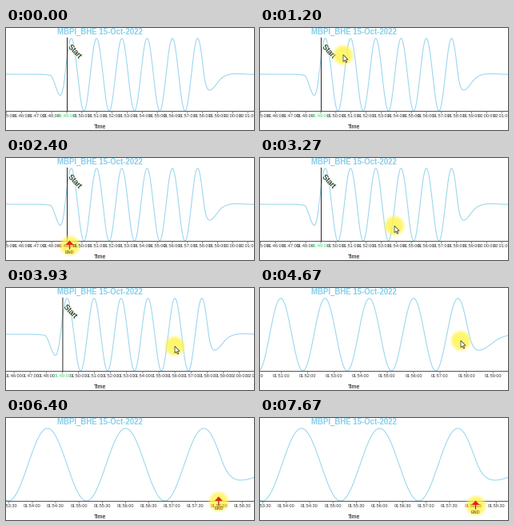
Write a matplotlib script that moves like this. It is 310 by 128 pixels and loops after 7.79 s.

```python
import numpy as np
import matplotlib.pyplot as plt
from matplotlib import patheffects
from matplotlib.animation import FuncAnimation
from matplotlib.patches import Polygon

W, H, DPI = 310, 128, 100
FRAMES, STEP = 205, 38          # 7790 ms per loop
AXIS_Y = 104.5
SKY = "#87ceeb"
INK = "#333333"
GREEN = "#45cc74"
AMBER = "#b06a20"

plt.rcParams["font.family"] = "Liberation Sans"


def pt(px):
    return px * 72 / DPI


# --- signal: y in pixels as a function of minutes after 01:00 ---
OMEGA = 2 * np.pi / 1.675
SINE_FROM, SINE_TO = 48.88, 58.05


def sine(t):
    return 58.5 - 45.5 * np.cos(OMEGA * (t - 56))


def sine_slope(t):
    return 45.5 * OMEGA * np.sin(OMEGA * (t - 56))


def hermite(t, knots):
    kt, ky, km = np.array(knots).T
    t = np.clip(t, kt[0], kt[-1])
    i = np.clip(np.searchsorted(kt, t, side="right") - 1, 0, len(kt) - 2)
    d = kt[i + 1] - kt[i]
    u = (t - kt[i]) / d
    s = u * u * (3 - 2 * u)
    return (ky[i] * (1 - s) + ky[i + 1] * s
            + d * u * (1 - u) * ((1 - u) * km[i] - u * km[i + 1]))


HEAD = [(46.5, 58, 0), (47.9, 59.3, 3), (48.57, 84.5, 0),
        (SINE_FROM, sine(SINE_FROM), sine_slope(SINE_FROM))]
TAIL = [(SINE_TO, sine(SINE_TO), sine_slope(SINE_TO)), (58.47, 78, 0),
        (58.8, 73.5, -23), (59.15, 65, -20), (59.6, 59.3, -7),
        (60.3, 57.4, 0), (61.3, 58.2, 0)]


def signal(t):
    return np.where(t < SINE_FROM, hermite(t, HEAD),
                    np.where(t < SINE_TO, sine(t), hermite(t, TAIL)))


# --- motion ---
ZOOM_T = [3700, 3930, 4620, 4820, 5560]
ZOOM_S = [18.85, 20.2, 33.05, 33.05, 58.3]      # pixels per minute
PAN_S = [18.85, 20.2, 33.05, 58.3]
PAN_X = [207.95, 211.4, 192, 149.5]             # x of 01:56:00

POINTER_ON = 870
POINTER = np.array([
    (870, 116, 58), (1180, 104, 33.5), (1400, 103, 31.5), (1550, 103, 31.5),
    (1740, 93, 60), (1850, 93, 60), (2380, 79.5, 110), (2570, 79.5, 110),
    (3700, 211, 73), (3940, 211, 73), (4250, 251, 66), (5380, 251, 66),
    (5590, 231, 58), (5640, 231, 58), (6560, 269.5, 110)])


def view(ms):
    scale = np.exp(np.interp(ms, ZOOM_T, np.log(ZOOM_S)))
    return scale, np.interp(scale, PAN_S, PAN_X)


def pointer_at(ms):
    times = POINTER[:, 0]
    i = int(np.clip(np.searchsorted(times, ms, side="right") - 1,
                    0, len(times) - 2))
    u = np.clip((ms - times[i]) / (times[i + 1] - times[i]), 0, 1)
    u = u * u * (3 - 2 * u)
    return POINTER[i, 1:] * (1 - u) + POINTER[i + 1, 1:] * u


def clock(minutes):
    sec = int(round(minutes * 60)) + 3600
    return f"{sec // 3600:02d}:{sec // 60 % 60:02d}:{sec % 60:02d}"


# --- stage ---
fig = plt.figure(figsize=(W / DPI, H / DPI), dpi=DPI, facecolor="white")
ax = fig.add_axes([0, 0, 1, 1])
ax.set_axis_off()

ax.text(64, 7.8, "MBPI_BHE 15-Oct-2022", color=SKY, size=pt(9.6),
        weight="bold", va="baseline")
ax.text(117.7, 125.7, "Time", color="black", size=pt(7), ha="center",
        va="baseline")

xs = np.arange(-1, W + 1.5, 0.5)
curve, = ax.plot([], [], color=SKY, lw=pt(1.05), alpha=0.85, zorder=2)
ax.plot([0, W], [AXIS_Y, AXIS_Y], color="#555555", lw=pt(1), snap=False,
        zorder=3)
ticks, = ax.plot([], [], color="#666666", lw=pt(0.8), snap=False, zorder=3)
labels = [ax.text(0, 112.2, "", color=INK, size=pt(5.5), ha="center",
                  va="baseline", zorder=6) for _ in range(20)]

start_line, = ax.plot([], [], color="#2a2a2a", lw=pt(1), snap=False, zorder=3)
start_text = ax.text(0, 29.5, "Start", color="black", size=pt(9.3),
                     ha="center", va="center", rotation=-47,
                     rotation_mode="anchor", zorder=4)
start_text.set_path_effects([
    patheffects.withStroke(linewidth=pt(2.4), foreground="#e4f3e4")])

# soft yellow spot around the pointer
R = 15
gy, gx = np.mgrid[-R:R:61j, -R:R:61j]
glow = np.ones((61, 61, 4))
glow[..., :3] = (1, 0.96, 0.3)
glow[..., 3] = 0.8 * np.clip((14.5 - np.hypot(gx, gy)) / 5, 0, 1)
spot = ax.imshow(glow, extent=(0, 1, 1, 0), aspect="auto",
                 interpolation="bilinear", zorder=5)

ARROW = np.array([(0, 0), (0, 8.6), (2, 6.8), (3.4, 9.9), (4.7, 9.3),
                  (3.4, 6.3), (6, 6.2)])
arrow = ax.add_patch(Polygon(ARROW, fc="white", ec="#4a4a4a", lw=pt(0.85),
                             zorder=8))

HEAD_UP = np.array([(0, -6.5), (5, -1), (-5, -1)])
head = ax.add_patch(Polygon(HEAD_UP, fc="#e0281c", ec="none", zorder=8))
stem, = ax.plot([], [], color="#b03018", lw=pt(1.3), snap=False, zorder=7)
end_text = ax.text(0, 0, "END", color="#5a3a10", size=pt(5.4), ha="center",
                   va="baseline", zorder=8)

ax.set_xlim(0, W)
ax.set_ylim(H, 0)


def draw_ticks(scale, x56, hover_x):
    step = 0.5 if scale > 36 else 1
    first = np.ceil((56 + (-15 - x56) / scale) / step) * step
    tx, ty = [], []
    for k, label in enumerate(labels):
        minute = first + k * step
        x = x56 + scale * (minute - 56)
        label.set_visible(x < W + 15)
        label.set_x(x)
        label.set_text(clock(minute))
        color = GREEN if minute == 49 else INK
        if hover_x is not None and abs(x - hover_x) < 6:
            color = AMBER
        label.set_color(color)
        tx += [x, x, np.nan]
        ty += [AXIS_Y, AXIS_Y + 2.3, np.nan]
    ticks.set_data(tx, ty)


def draw_pointer(ms, x, y, hover):
    shown = ms >= POINTER_ON
    spot.set_visible(shown)
    spot.set_extent((x - R, x + R, y + R, y - R))
    arrow.set_visible(shown and not hover)
    arrow.set_xy(ARROW + (x, y))
    for part in (head, stem, end_text):
        part.set_visible(hover)
    head.set_xy(HEAD_UP + (x, y))
    stem.set_data([x, x], [y - 1.5, y + 4])
    end_text.set_position((x, y + 10.2))


def draw(i):
    ms = i * STEP
    scale, x56 = view(ms)
    curve.set_data(xs, signal(56 + (xs - x56) / scale))

    x0 = x56 - 7 * scale + 0.5
    start_line.set_data([x0, x0], [12.5, AXIS_Y])
    start_text.set_x(x0 + 9.7)
    start_text.set_visible(x0 > -25)

    x, y = pointer_at(ms)
    hover = bool(ms >= POINTER_ON and y > 98)
    draw_ticks(scale, x56, x if hover else None)
    draw_pointer(ms, x, y, hover)

    ax.set_xlim(0, W)
    ax.set_ylim(H, 0)
    return []


anim = FuncAnimation(fig, draw, frames=FRAMES, interval=STEP, repeat=True,
                     repeat_delay=0, cache_frame_data=False)
plt.show()
```
